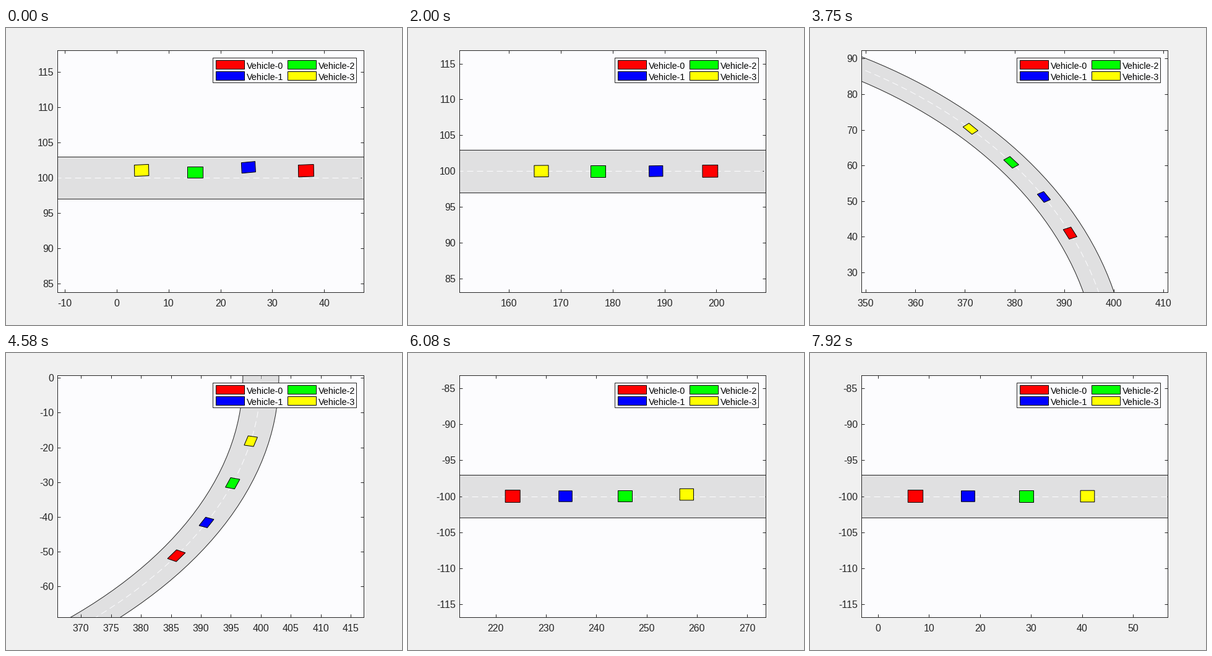
These frames come from a looping animation (640 px wide and 480 px high, 8000 ms). A matplotlib script:

```python
import numpy as np
import matplotlib.pyplot as plt
from matplotlib.animation import FuncAnimation
from matplotlib.patches import Polygon, Rectangle
from matplotlib.ticker import FuncFormatter, MultipleLocator

W, H, DPI = 640, 480, 100
PX = 72 / DPI                       # one pixel in points
LOOP, TICK = 8000, 20               # ms
STEP = LOOP / 96                    # ms per picture
PAGE, PLOT, ROAD, INK = "#f0f0f0", "#fcfcfe", "#e0e0e1", "#262626"

plt.rcParams["font.family"] = "Liberation Sans"

# Road: straight, half circle, straight back
TURN, RADIUS = 300, 100
EXIT = TURN + np.pi * RADIUS

# name, colour, length, width, starting offset, starting tilt, look-ahead
CARS = [
    ("Vehicle-0", "#ff0000", 2.95, 1.70, 1.00, 1.7, 0),
    ("Vehicle-1", "#0000ff", 2.65, 1.50, 1.48, 3.8, 0),
    ("Vehicle-2", "#00ff00", 2.90, 1.60, 0.78, 0.0, 0),
    ("Vehicle-3", "#ffff00", 2.75, 1.60, 1.05, 2.0, 6),
]

# Gap to the car ahead at a few steps of the run
GAP_STEPS = [0, 11, 29, 38, 46, 61, 79]
GAPS = [
    [11.1, 9.3, 11.6, 11.45, 10.8, 10.5, 10.3],
    [10.3, 10.5, 11.8, 11.75, 12.1, 11.8, 11.4],
    [10.3, 10.0, 11.9, 12.5, 12.5, 12.3, 12.0],
]

# View box around the first and last car, in their own frames
LEAD_BOX = np.array([(10.6, 16.8), (10.6, -16.8), (-15.7, 16.8), (-15.7, -16.8)])
TAIL_BOX = np.array([(-15.7, 15.5), (-15.7, -15.5)])


def pose(s, off=0.0):
    """Position and heading at distance s along the road, off to its left."""
    r = RADIUS + off
    if s < TURN:
        return s, r, 0.0
    if s < EXIT:
        a = (s - TURN) / RADIUS
        return TURN + r * np.sin(a), r * np.cos(a), -a
    return TURN - (s - EXIT), -r, -np.pi


def place(points, x, y, heading):
    c, s = np.cos(heading), np.sin(heading)
    return points @ np.array([(c, s), (-s, c)]) + (x, y)


def road_line(off):
    stops = [-80, *np.linspace(TURN, EXIT, 121), EXIT + TURN + 80]
    return np.array([pose(s, off)[:2] for s in stops])


def body(length, width):
    return np.array([(1, 1), (1, -1), (-1, -1), (-1, 1)]) * (length / 2, width / 2)


def lead_distance(m):
    ramp = max(1 - m / 14.64, 0)
    return 12 * m - 41.2 + 77.7 * ramp ** 2


def car_poses(m):
    s = lead_distance(m)
    poses = []
    for i, (*_, off0, tilt, ahead) in enumerate(CARS):
        if i:
            s -= np.interp(m, GAP_STEPS, GAPS[i - 1])
        off = off0 * np.exp(-m / 3) - 0.25 * np.exp(-((s - 655) / 10) ** 2)
        x, y, _ = pose(s, off)
        heading = pose(s + ahead)[2] + np.radians(tilt) * np.exp(-m / 12)
        poses.append((x, y, heading))
    return poses


fig = plt.figure(figsize=(W / DPI, H / DPI), dpi=DPI, facecolor=PAGE)
ax = fig.add_axes([83 / W, 1 - 427 / H, 495 / W, 391 / H], facecolor=PLOT)
for spine in ax.spines.values():
    spine.set(linewidth=PX, color=INK)
ax.tick_params(direction="in", top=True, right=True, length=5 * PX, width=PX,
               color=INK, labelcolor=INK, labelsize=16 * PX)
ax.tick_params(axis="x", pad=10.7 * PX)
ax.tick_params(axis="y", pad=6 * PX)
locators = MultipleLocator(10), MultipleLocator(5)
for axis, locator in zip((ax.xaxis, ax.yaxis), locators):
    axis.set_major_locator(locator)
    axis.set_major_formatter(FuncFormatter(lambda v, _: str(int(round(v)))))

left, right = road_line(3), road_line(-3)
ax.add_patch(Polygon(np.vstack([left, right[::-1]]), fc=ROAD, ec="none", zorder=1))
for edge in (left, right):
    ax.plot(*edge.T, color=INK, lw=PX, zorder=2)
ax.plot(*road_line(0).T, color="#fcfcfe", lw=PX, dashes=(10, 6), zorder=2,
        dash_capstyle="butt")

bodies = [body(*car[2:4]) for car in CARS]
shapes = [ax.add_patch(Polygon(b, fc=car[1], ec="black", lw=PX, zorder=3))
          for b, car in zip(bodies, CARS)]

# Legend, laid out in pixels
key = fig.add_axes([0, 0, 1, 1], zorder=5)
key.set(xlim=(0, W), ylim=(H, 0))
key.axis("off")
key.add_patch(Rectangle((334, 48), 232, 40, fc=PLOT, ec=INK, lw=PX))
for i, car in enumerate(CARS):
    col, row = divmod(i, 2)
    x, y = 339 + 116 * col, 52 + 18 * row
    key.add_patch(Rectangle((x, y), 46, 14, fc=car[1], ec="black", lw=PX))
    key.text(x + 49.5, y + 14, car[0], size=14.4 * PX, color="black", va="baseline")


def draw(n):
    k = int((n * TICK + 14) / STEP)
    m = k - (k + 2) // 6            # every sixth picture is held
    poses = car_poses(m)
    for shape, b, p in zip(shapes, bodies, poses):
        shape.set_xy(place(b, *p))
    view = np.vstack([place(LEAD_BOX, *poses[0]), place(TAIL_BOX, *poses[-1])])
    (x0, y0), (x1, y1) = view.min(axis=0), view.max(axis=0)
    locators[0].set_params(base=5 if x1 - x0 < 53 else 10)
    locators[1].set_params(base=5 if y1 - y0 < 45 else 10)
    ax.set_xlim(x0, x1)
    ax.set_ylim(y0, y1)
    return shapes


anim = FuncAnimation(fig, draw, frames=LOOP // TICK, interval=TICK,
                     repeat=True, repeat_delay=0, blit=False)
plt.show()
```
